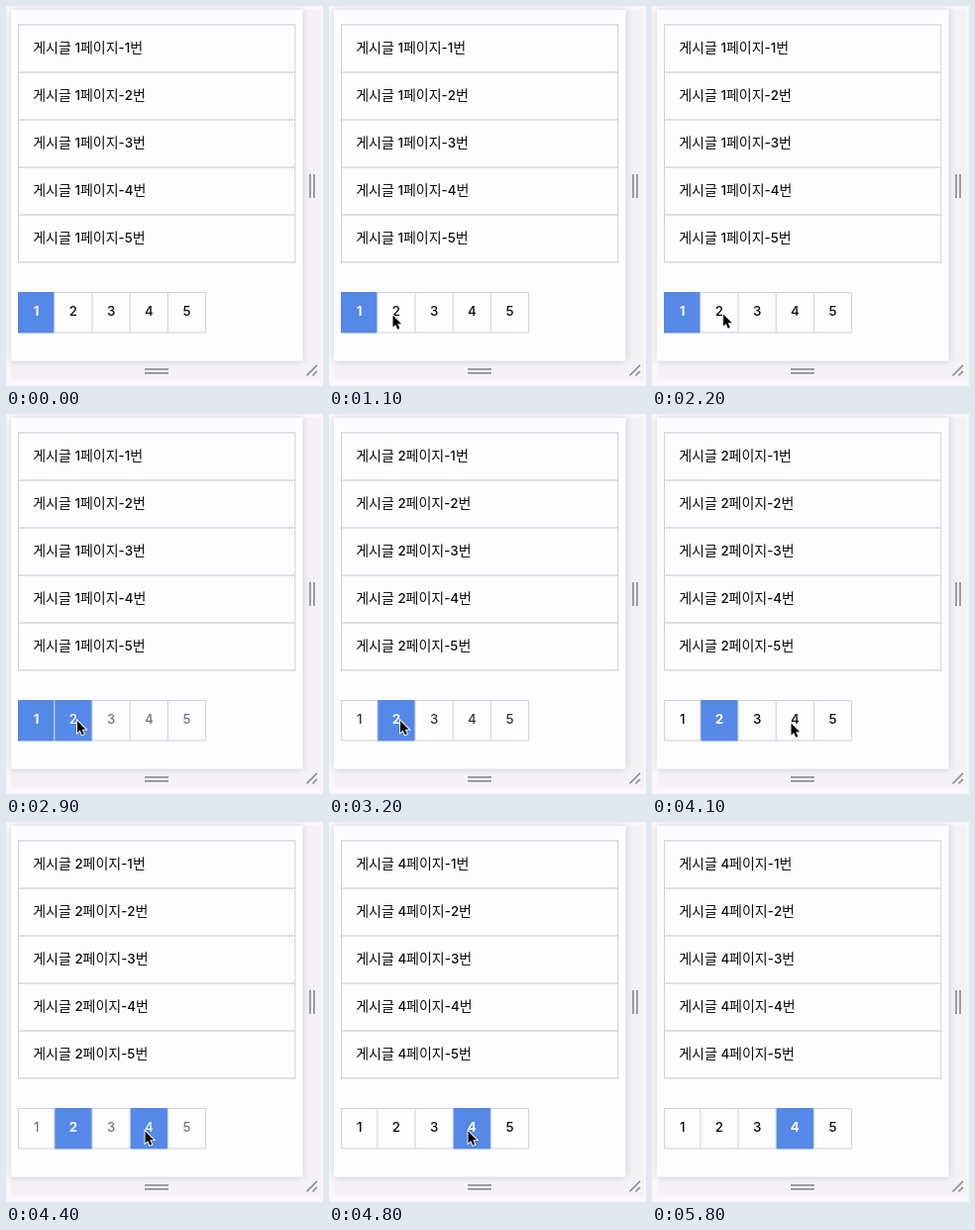
An HTML page with a canvas that plays this animation: 320 px wide and 384 px high, repeating every 6100 ms.

```html
<!DOCTYPE html>
<html lang="ko">
<head>
<meta charset="utf-8">
<title>게시글</title>
<style>
html, body { margin: 0; width: 100%; height: 100%; overflow: hidden; background: #f9f7fb; }
canvas { display: block; }
</style>
</head>
<body>
<canvas id="stage" width="320" height="384"></canvas>
<script>
const ctx = document.getElementById('stage').getContext('2d');
const LOOP = 6100, STEP = 100, ROW = 48, CELL = 38.2;
const HANGUL = '"Noto Sans CJK KR", "Noto Sans CJK JP", sans-serif';
const LATIN = 'Inter, "Open Sans", sans-serif';
const BLUE = [85, 136, 231], PAPER = [253, 252, 255], INK = [12, 12, 14], DIM = [118, 118, 122];
const EDGE = '#d0d0d5', GRIP = '#8d8d91';

// pointer moves along quadratic curves and rests in between
const MOVES = [
  { start: 1000, end: 1100, from: [132, 326], bend: [98, 319], to: [64.5, 312.5] },
  { start: 2100, end: 2200, from: [64.5, 312.5], bend: [68, 312], to: [72, 311.5] },
  { start: 2700, end: 2900, from: [72, 311.5], bend: [72, 311], to: [72, 310] },
  { start: 3400, end: 4100, from: [72, 310], bend: [110, 355], to: [140.5, 312.5] },
  { start: 5200, end: 5500, from: [140.5, 312.5], bend: [162, 348], to: [184, 385] }
];
const HOVERS = [
  { cell: 2, start: 2200, full: 2800, click: 3200 },
  { cell: 4, start: 4100, full: 4400, click: 4700 }
];

const clamp = v => Math.max(0, Math.min(1, v));
const smooth = v => v * v * (3 - 2 * v);
const easeOut = v => 1 - Math.pow(1 - v, 1.65);
const mix = (a, b, p) => `rgb(${a.map((v, i) => Math.round(v + (b[i] - v) * p)).join(',')})`;
const edge = i => i ? 48.3 + (i - 1) * CELL : 12;

function rect(x, y, w, h, color) {
  ctx.fillStyle = color;
  ctx.fillRect(x, y, w, h);
}

function line(x1, y1, x2, y2) {
  ctx.strokeStyle = GRIP;
  ctx.lineWidth = 1.7;
  ctx.beginPath();
  ctx.moveTo(x1, y1);
  ctx.lineTo(x2, y2);
  ctx.stroke();
}

function text(str, x, y) {
  for (const ch of str) {
    ctx.font = ch > '~' ? `500 14px ${HANGUL}` : `500 13.3px ${LATIN}`;
    ctx.fillText(ch, x, y);
    x += ctx.measureText(ch).width;
  }
}

function drawFrame() {
  rect(0, 0, 320, 384, '#f9f7fb');
  rect(299, 3, 19, 375, '#f4f2f5');
  rect(5, 358, 313, 20, '#f4f2f5');
  ctx.save();
  ctx.shadowColor = 'rgba(0,0,0,.14)';
  ctx.shadowBlur = 8;
  rect(5, 4, 294.5, 354.6, mix(PAPER, PAPER, 0));
  ctx.restore();
  for (const d of [0, 4]) {
    line(307 + d, 170, 307 + d, 194);
    line(140, 367 + d, 164, 367 + d);
  }
  line(303.5, 373.5, 314, 363);
  line(309.5, 373.5, 314, 369);
}

function drawList(page) {
  for (let i = 0; i < 6; i++) rect(12, 18.4 + i * ROW, 280, 1.2, EDGE);
  for (const x of [12, 291.3]) rect(x, 18.4, 1, 241, EDGE);
  ctx.textAlign = 'left';
  ctx.fillStyle = mix(INK, INK, 0);
  for (let i = 0; i < 5; i++) text(`게시글 ${page}페이지-${i + 1}번`, 27.2, 47 + i * ROW);
}

function drawPager(page, hover, fade) {
  rect(12, 289, 190, 1, EDGE);
  rect(12, 329.4, 190, 1, EDGE);
  for (let i = 0; i <= 5; i++) rect(edge(i), 289, 1, 41, EDGE);
  ctx.textAlign = 'center';
  for (let n = 1; n <= 5; n++) {
    const x = edge(n - 1), right = edge(n), on = n === page;
    const lit = on ? 1 : n === hover ? fade : 0;
    if (lit) {
      const left = n > 1 ? x + 1 : x;
      ctx.globalAlpha = lit;
      rect(left, 289, right - left, 41.4, mix(BLUE, BLUE, 0));
      ctx.globalAlpha = 1;
    }
    ctx.font = `${on ? 700 : 500} 13.3px ${LATIN}`;
    ctx.fillStyle = lit ? mix(INK, PAPER, lit) : mix(INK, DIM, fade);
    ctx.fillText(n, (x + right + 1) / 2, 313.3);
  }
}

function drawPointer(t) {
  const move = MOVES.filter(m => m.start <= t).pop();
  if (!move || t >= 5500) return;
  const u = easeOut(clamp((t - move.start) / (move.end - move.start)));
  const [x, y] = [0, 1].map(k =>
    (1 - u) ** 2 * move.from[k] + 2 * u * (1 - u) * move.bend[k] + u * u * move.to[k]);
  ctx.save();
  ctx.translate(x, y);
  ctx.beginPath();
  for (const [px, py] of [[0, 0], [0, 12], [2.7, 9.5], [4.7, 14.2], [6.8, 13.3], [4.7, 8.7], [8.6, 8.7]]) {
    ctx.lineTo(px, py);
  }
  ctx.closePath();
  ctx.lineWidth = 1.8;
  ctx.strokeStyle = '#fff';
  ctx.stroke();
  ctx.fillStyle = '#000';
  ctx.fill();
  ctx.restore();
}

function render(now) {
  const t = Math.floor((now % LOOP) / STEP) * STEP;
  let page = 1, hover = 0, fade = 0;
  for (const h of HOVERS) {
    if (t >= h.click) {
      page = h.cell;
      fade = t < h.click + STEP ? 0.4 : 0;
    } else if (t >= h.start) {
      hover = h.cell;
      fade = smooth(clamp((t - h.start) / (h.full - h.start)));
    }
  }
  drawFrame();
  drawList(page);
  drawPager(page, hover, fade);
  drawPointer(t);
}

const start = performance.now();
function tick() {
  render(performance.now() - start);
  requestAnimationFrame(tick);
}
tick();
</script>
</body>
</html>
```
